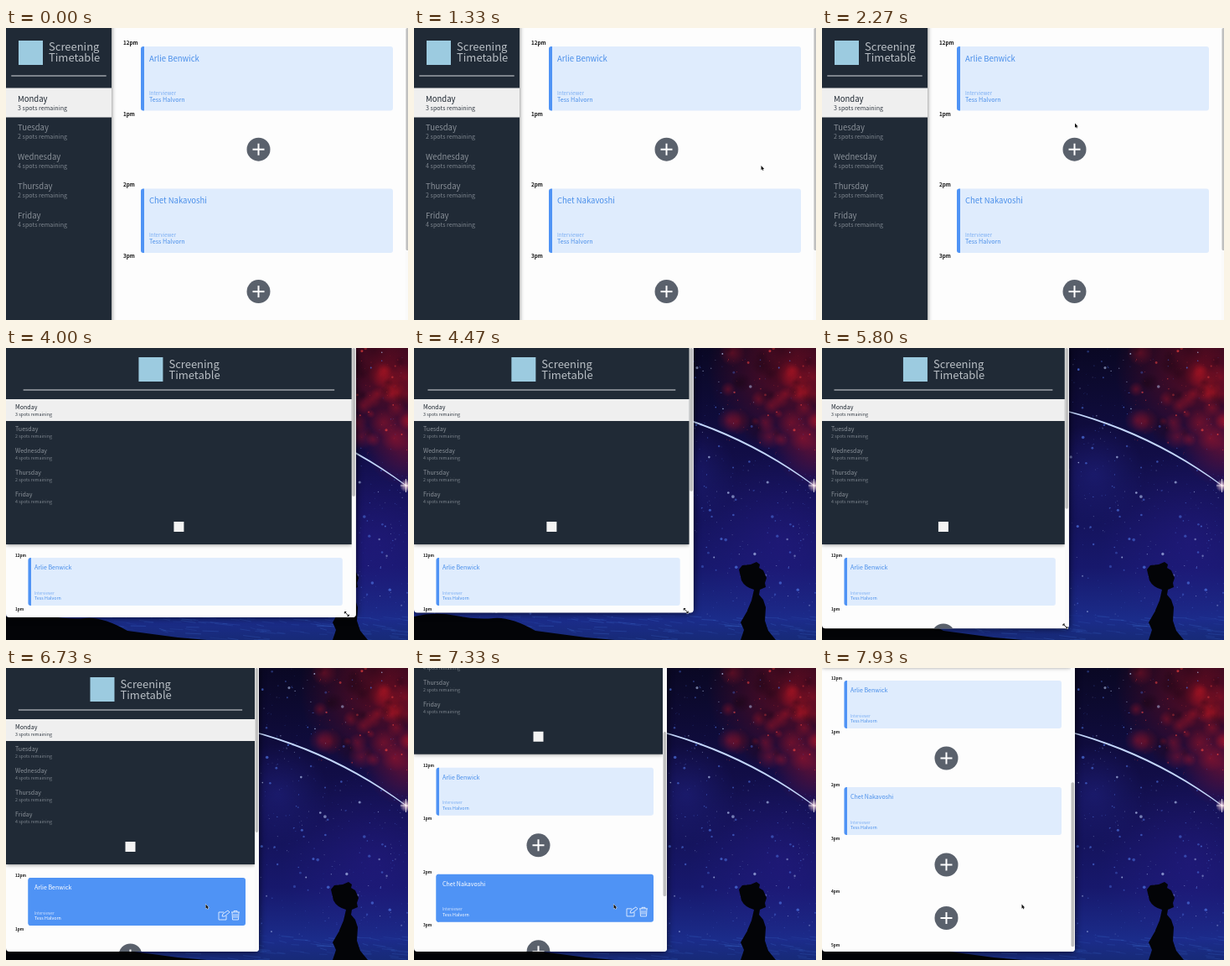
An HTML page with a canvas that plays this animation: 480x348 px, repeating every 8000 ms.

```html
<!DOCTYPE html>
<html lang="en">
<head>
<meta charset="utf-8">
<title>Resizable schedule</title>
<style>
  html, body { margin: 0; width: 100%; height: 100%; overflow: hidden; background: #fdfdfd; }
  canvas { display: block; width: 480px; height: 348px; }
</style>
</head>
<body>
<canvas id="stage"></canvas>
<script>
const WIDTH = 480, HEIGHT = 348, LOOP = 8000, TAU = Math.PI * 2;
const FONT = '"Noto Sans CJK JP", "Noto Sans CJK SC", "Noto Sans CJK", "Open Sans", sans-serif';
const NAVY = '#202a36', BLUE = '#4f93f5', PALE = '#dfecfd';
const dpr = window.devicePixelRatio || 1;

function prepare(canvas) {
  canvas.width = WIDTH * dpr;
  canvas.height = HEIGHT * dpr;
  const context = canvas.getContext('2d');
  context.scale(dpr, dpr);
  return context;
}
const ctx = prepare(document.getElementById('stage'));
const wallpaper = document.createElement('canvas');

// Measurements of the two page layouts; plusY is counted from the hour label
const WIDE = {
  title: [27, 40], iconTop: 15, rule: 57, dayX: 14, dayTop: 71.5, dayStep: 34.9, daySub: 26,
  dayBase: 16, main: 126, labelX: 14, labelY: 20, hourStep: 84.7, cardX: 35, cardTop: 2,
  cardHeight: 76.5, cardRight: 20, bar: 4, scale: 1, textX: 10, textY: [18, 57.5, 66], plusY: 40,
  content: 457
};
const NARROW = {
  title: [24, 37], iconTop: 11, rule: 50, dayX: 11, dayTop: 61, dayStep: 26.1, daySub: 19.8,
  dayBase: 12, main: 0, labelX: 11, labelY: 249, hourStep: 63.5, cardX: 26.5, cardTop: 1,
  cardHeight: 57, cardRight: 16, bar: 3.5, scale: .745, textX: 7.5, textY: [13.7, 43.6, 50], plusY: 30,
  content: 583
};
const DAYS = [['Monday', 3], ['Tuesday', 2], ['Wednesday', 4], ['Thursday', 2], ['Friday', 4]];
const SLOTS = ['Arlie Benwick', null, 'Chet Nakavoshi', null, null];
const HOURS = ['12pm', '1pm', '2pm', '3pm', '4pm', '5pm'];

// Tracks: [time, ...values]
const SIZE = [[3200, 482, 348], [4000, 418, 321], [4950, 248, 310], [5150, 248, 310], [5900, 302, 338]];
const POINTER = [
  [930, 484, 275], [1330, 414.5, 164], [2130, 288, 104], [2270, 302, 113.5], [2450, 302, 113.5],
  [2930, 474, 343], [3200, 474, 343], [4000, 407, 317], [4950, 241, 309], [5150, 241, 309],
  [5900, 298, 335], [6500, 238.5, 281.5]
];
const SCROLL = [[6900, 0], [7700, 235]];

const linear = k => k;
const smooth = k => k * k * (3 - 2 * k);

function track(keys, t, ease) {
  const next = keys.findIndex(key => key[0] > t);
  if (next === 0) return keys[0].slice(1);
  if (next < 0) return keys[keys.length - 1].slice(1);
  const from = keys[next - 1], to = keys[next];
  const k = ease((t - from[0]) / (to[0] - from[0]));
  return from.slice(1).map((value, i) => value + (to[i + 1] - value) * k);
}

function box(x, y, w, h, color, radius = 0) {
  ctx.fillStyle = color;
  ctx.beginPath();
  ctx.roundRect(x, y, w, h, radius);
  ctx.fill();
}

function text(string, x, y, size, color, weight = 400) {
  ctx.font = `${weight} ${size}px ${FONT}`;
  ctx.fillStyle = color;
  ctx.fillText(string, x, y);
}

function line(color, width, d) {
  ctx.strokeStyle = color;
  ctx.lineWidth = width;
  ctx.stroke(new Path2D(d));
}

function withShadow(blur, color, paint) {
  ctx.save();
  ctx.shadowBlur = blur * dpr;
  ctx.shadowColor = color;
  paint();
  ctx.restore();
}

function paintWallpaper() {
  const sky = prepare(wallpaper);
  let seed = 11;
  const random = () => (seed = seed * 16807 % 2147483647) / 2147483647;
  const glow = (x, y, r, rgb, alpha) => {
    const g = sky.createRadialGradient(x, y, 0, x, y, r);
    g.addColorStop(0, `rgba(${rgb},${alpha})`);
    g.addColorStop(1, `rgba(${rgb},0)`);
    sky.fillStyle = g;
    sky.fillRect(x - r, y - r, 2 * r, 2 * r);
  };
  const fill = (color, d) => {
    sky.fillStyle = color;
    sky.fill(new Path2D(d));
  };
  const base = sky.createLinearGradient(0, 0, 0, HEIGHT);
  [[0, '#0a0824'], [.35, '#110d45'], [.75, '#17186c'], [.93, '#1b2c8a'], [1, '#172a78']]
    .forEach(stop => base.addColorStop(...stop));
  sky.fillStyle = base;
  sky.fillRect(0, 0, WIDTH, HEIGHT);
  glow(325, 150, 60, '40,45,160', .35);
  glow(440, 230, 110, '45,30,150', .35);
  glow(455, 25, 105, '120,12,28', .75);
  glow(478, 115, 50, '140,18,45', .6);
  for (let i = 0; i < 50; i++) {
    const x = 375 + random() * 105, y = random() * 110;
    glow(x, y, 5 + random() * 13, random() < .5 ? '215,25,35' : '25,5,20', .3);
  }

  // Stars
  for (let i = 0; i < 1100; i++) {
    const x = random() * WIDTH, y = random() * 322;
    const red = x > 370 && y < 130 && random() < .7;
    sky.fillStyle = red ? '#e8413f' : random() < .25 ? '#c4d6ff' : '#4a6cd8';
    sky.globalAlpha = .3 + random() * .5;
    sky.beginPath();
    sky.arc(x, y, .4 + random() ** 6 * 1.5, 0, TAU);
    sky.fill();
  }

  // Streaked field under the horizon
  sky.strokeStyle = '#3f6fd0';
  sky.lineWidth = .7;
  for (let i = 0; i < 160; i++) {
    const x = random() * WIDTH, y = 318 + random() * 30;
    sky.globalAlpha = .1 + random() * .35;
    sky.beginPath();
    sky.moveTo(x, y);
    sky.lineTo(x + 6 + random() * 16, y + random() * 3);
    sky.stroke();
  }
  sky.globalAlpha = 1;

  // Comet
  fill('#c3d6fa', 'M220 61Q366 79 478 163.5L478 164.8Q364 82 220 61Z');
  glow(478, 164, 8, '255,215,225', .9);
  sky.strokeStyle = '#fff';
  sky.lineWidth = .7;
  sky.stroke(new Path2D('M471 164H480M477.5 156V172'));

  // Trees and seated figure
  fill('#030407', 'M0 320Q25 314 50 319T95 322T145 337L205 345L240 348H0Z');
  fill('#030407', 'M388 264L392 259L402 258L409 255L413 258L412 262L417 265L421 274L419 280L420 285L413 288' +
    'L412 294L417 300L420 309L419 325L423 337L432 348H390L394 336L390 327L397 315L403 301L406 288' +
    'Q395 285 391 277Z');
}

function drawBrand(x, layout) {
  box(x, layout.iconTop, 29, 29, '#9ccbe0');
  text('Screening', x + 36, layout.title[0], 13, '#b9bfc5', 300);
  text('Timetable', x + 36, layout.title[1], 13, '#b9bfc5', 300);
}

function drawSidebar(layout, width, height) {
  const wide = layout === WIDE;
  withShadow(5, 'rgba(0,0,0,.55)', () => box(0, -10, width, height + 10, NAVY));
  drawBrand(wide ? 15 : width / 2 - 48, layout);
  box(width * .05, layout.rule - .5, width * .9, 1, '#d9dcdf');
  DAYS.forEach(([day, spots], i) => {
    const top = layout.dayTop + i * layout.dayStep;
    if (!i) box(0, top, width, layout.dayStep, '#efefef');
    const colors = i ? ['#8a9199', '#7d858e'] : ['#1d2630', '#333b44'];
    text(day, layout.dayX, top + layout.dayBase, 9.5 * layout.scale, colors[0]);
    text(`${spots} spots remaining`, layout.dayX, top + layout.daySub, 7.15 * layout.scale, colors[1]);
  });
  if (!wide) box(width / 2 - 6, 207, 12, 12, '#f3f3f3');
}

function drawCardIcons(right, y) {
  ctx.save();
  ctx.translate(right, y);
  line('#e6f0ff', .9, 'M-26 -4H-32V5H-23V0M-28 1L-27 -2L-21 -6L-19 -4L-25 1Z' +
    'M-17 -4H-7M-14 -4V-5.5H-10V-4M-16 -4L-15.5 5H-8.5L-8 -4M-14 -2V3M-12 -2V3M-10 -2V3');
  ctx.restore();
}

function drawCard(name, x, y, width, layout, hovered) {
  const s = layout.scale, tx = x + layout.textX, [nameY, roleY, personY] = layout.textY;
  const ink = hovered ? '#fff' : '#4a8fea';
  box(x, y, width, layout.cardHeight, hovered ? BLUE : PALE, 3);
  box(x, y, layout.bar, layout.cardHeight, BLUE, [3, 0, 0, 3]);
  text(name, tx, y + nameY, 9.5 * s, ink);
  text('Interviewer', tx, y + roleY, 6 * s, hovered ? '#d5e5ff' : '#79adf3');
  text('Tess Halvorn', tx, y + personY, 7.2 * s, ink, hovered ? 500 : 400);
  if (hovered) drawCardIcons(x + width, y + 45);
}

function drawPlus(x, y) {
  box(x - 14, y - 14, 28, 28, '#5a616c', 14);
  box(x - 7, y - 1, 14, 2, '#fff');
  box(x - 1, y - 7, 2, 14, '#fff');
}

function drawSchedule(layout, pageWidth, windowWidth, pointer) {
  const left = layout.main + layout.cardX;
  const width = windowWidth - layout.cardRight - left;
  HOURS.forEach((hour, i) => {
    const y = layout.labelY + i * layout.hourStep;
    const top = y + layout.cardTop;
    text(hour, layout.main + layout.labelX, y, 6.3 * layout.scale, '#111', 700);
    if (SLOTS[i]) {
      const hovered = pointer && pointer[0] > left && pointer[0] < left + width &&
        pointer[1] > top && pointer[1] < top + layout.cardHeight;
      drawCard(SLOTS[i], left, top, width, layout, hovered);
    } else if (i < SLOTS.length) {
      drawPlus((layout.main + pageWidth) / 2, y + layout.plusY);
    }
  });
}

function drawPointer([x, y], resizing) {
  ctx.save();
  ctx.translate(x, y);
  if (resizing) {
    const arrows = 'M-2.3 -2.3L2.3 2.3M-2.5 -.5V-2.5H-.5M2.5 .5V2.5H.5';
    line('#fff', 1.8, arrows);
    line('#111', 1, arrows);
  } else {
    const arrow = 'M0 0V5.2L1.2 4.2L2.1 6L2.9 5.6L2.1 3.9H3.7Z';
    line('#fff', .8, arrow);
    ctx.fillStyle = '#111';
    ctx.fill(new Path2D(arrow));
  }
  ctx.restore();
}

function draw(t) {
  const [w, h] = track(SIZE, t, linear);
  const resizing = t >= 3100 && t < 5950;
  const pointer = track(POINTER, t, resizing ? linear : smooth);
  const [scroll] = track(SCROLL, t, smooth);
  const layout = w > 458 ? WIDE : NARROW;
  const pageWidth = w - 5;
  const radius = t < 3200 ? 0 : [0, 0, 4, 4];

  ctx.drawImage(wallpaper, 0, 0, WIDTH, HEIGHT);
  withShadow(9, 'rgba(0,0,0,.75)', () => box(0, 0, w, h, '#fdfdfd', radius));

  ctx.save();
  ctx.beginPath();
  ctx.roundRect(0, 0, w, h, radius);
  ctx.clip();
  ctx.translate(0, -scroll);
  drawSchedule(layout, pageWidth, w, t > 5950 && [pointer[0], pointer[1] + scroll]);
  if (layout === WIDE) drawSidebar(layout, layout.main, layout.content);
  else drawSidebar(layout, pageWidth, 234);
  ctx.translate(0, scroll);
  box(pageWidth, 0, 5, h, '#fafafa');
  box(w - 4.5, scroll * h / layout.content, 3.7, h * h / layout.content, '#bfbfbf', 2);
  ctx.restore();

  if (t >= 930) drawPointer(pointer, resizing);
}

paintWallpaper();
(function frame() {
  draw(performance.now() % LOOP);
  requestAnimationFrame(frame);
})();
</script>
</body>
</html>
```
